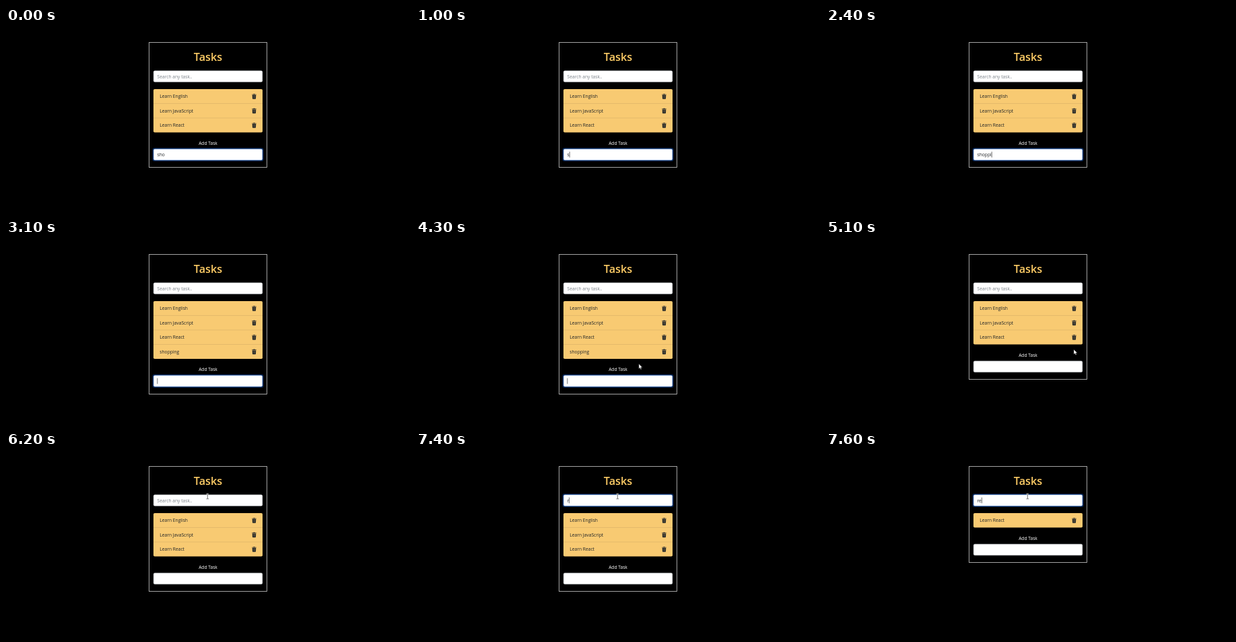
An HTML page that plays this animation: 600 by 274 pixels, repeating every 8 s.

```html
<!DOCTYPE html>
<html lang="en">
<head>
<meta charset="utf-8">
<title>Tasks</title>
<style>
  html, body { margin: 0; width: 100%; height: 100%; overflow: hidden; background: #000; }
  svg { display: block; width: 100%; height: 100%; }
  text { font: 6.7px "Open Sans", "Noto Sans", sans-serif; fill: #212529; }
  .title { font-size: 16.3px; font-weight: 600; fill: #ffcd66; }
  .hint { fill: #7c838a; }
  .label { fill: #fff; }
  .mid { text-anchor: middle; }
</style>
</head>
<body>
<svg id="stage" viewBox="0 0 600 274" xmlns="http://www.w3.org/2000/svg">
  <defs>
    <g id="trash">
      <path d="M-3.2-3.1h2l.5-.7h1.4l.5.7h2v.9h-6.4zM-2.8-1.8h5.6l-.3 5.1q0 .6-.7.6h-3.6q-.7 0-.7-.6z" fill="#212529"/>
      <path d="M-1.2-.9v3.8M0-.9v3.8M1.2-.9v3.8" stroke="#f8ca72" stroke-width=".35" opacity=".6"/>
    </g>
    <path id="arrow" d="M0 0v7.2l1.7-1.5 1.1 2.6 1.2-.5-1.1-2.5h2.3z" fill="#fff" stroke="#222" stroke-width=".45"/>
    <path id="hand" d="M-1-4q.8-.7 1.5 0v2.5l2.3.5q.7.3.6 1.1l-.5 2.3-.6 1.8h-3.4l-2-3q-.3-1 .6-.9l1.5.8z" fill="#fff" stroke="#222" stroke-width=".5"/>
    <g id="beam" fill="none">
      <path d="M-1.7-3.6h1.2l.5.4.5-.4h1.2M0-3.2v6.4M-1.7 3.6h1.2l.5-.4.5.4h1.2" stroke="#fff" stroke-width="1.5"/>
      <path d="M-1.7-3.6h1.2l.5.4.5-.4h1.2M0-3.2v6.4M-1.7 3.6h1.2l.5-.4.5.4h1.2" stroke="#333" stroke-width=".7"/>
    </g>
  </defs>
  <rect id="frame" x="212.5" y="21.5" width="175" fill="none" stroke="#b4b4b4" stroke-width=".9"/>
  <text class="title mid" x="300" y="49.4">Tasks</text>
  <g id="search"></g>
  <g id="list"></g>
  <g id="add"><text class="label mid" x="300" y="-6.1">Add Task</text></g>
  <use id="pointer"/>
</svg>
<script>
const LOOP = 8000, ROW = 21.5, TOP = 91;
const $ = id => document.getElementById(id);

function el(parent, tag, attrs, content) {
  const node = document.createElementNS('http://www.w3.org/2000/svg', tag);
  set(node, attrs);
  if (content) node.textContent = content;
  return parent.appendChild(node);
}
function set(node, attrs) {
  for (const k in attrs) node.setAttribute(k, attrs[k]);
}
const show = (node, on) => node.style.display = on ? '' : 'none';

function makeField(g, hint) {
  const ring = el(g, 'rect', { x: 217.4, y: -1.6, width: 165.2, height: 20.2, rx: 3, fill: '#0d6efd', opacity: .3 });
  const box = el(g, 'rect', { x: 219.2, y: .2, width: 161.6, height: 16.6, rx: 1.8, fill: '#fff', 'stroke-width': .5 });
  const placeholder = el(g, 'text', { x: 224.5, y: 11.4, class: 'hint' }, hint);
  const text = el(g, 'text', { x: 224.5, y: 11.4 });
  const caret = el(g, 'rect', { y: 4.2, width: .6, height: 8.6, fill: '#111' });
  return (y, value, focused, caretOn) => {
    g.setAttribute('transform', `translate(0 ${y})`);
    show(ring, focused);
    box.setAttribute('stroke', focused ? '#86b7fe' : '#ced4da');
    show(placeholder, !value);
    text.textContent = value;
    show(caret, focused && caretOn);
    caret.setAttribute('x', 224.6 + (value ? text.getComputedTextLength() : 0));
  };
}
const drawSearch = makeField($('search'), 'Search any task..');
const drawAdd = makeField($('add'), '');

const panel = el($('list'), 'rect', { x: 219, y: TOP, width: 162, rx: 1.8, fill: '#f8ca72' });
const rows = ['Learn English', 'Learn JavaScript', 'Learn React', 'shopping'].map(name => {
  const g = el($('list'), 'g', {});
  const line = el(g, 'path', { d: 'M219 0h162', stroke: '#d9b167', 'stroke-width': .6 });
  el(g, 'text', { x: 228.3, y: 13.2 }, name);
  el(g, 'use', { href: '#trash', x: 368.5, y: 10.8 });
  return { name, g, line };
});

// [time, value] steps; the last one reached holds.
const typed = [[0, 'sho'], [100, 'sh'], [300, 's'], [400, ''], [700, 's'], [1200, 'sh'], [1500, 'sho'],
  [1700, 'shop'], [1800, 'shopp'], [2400, 'shoppi'], [2800, 'shoppin'], [2900, 'shopping'], [3100, '']];
const query = [[0, ''], [7400, 'r'], [7600, 're']];
const at = (steps, t) => steps.filter(s => s[0] <= t).pop()[1];

const blink = (t, from) => Math.floor((t - from) / 500) % 2 === 0;

function glide(t, from, to, a, b) {
  const p = Math.min(1, Math.max(0, (t - from) / (to - from)));
  const e = p * p * (3 - 2 * p);
  return a.map((v, i) => v + (b[i] - v) * e);
}

function drawPointer(t) {
  const node = $('pointer');
  show(node, t >= 4200);
  const [x, y] = t < 5500
    ? glide(t, 4100, 4700, [318, 196], [368, 167])
    : glide(t, 5500, 6200, [368, 167], [299.3, 66.2]);
  let kind = 'arrow';
  if (y < 80) kind = 'beam';
  else if (t < 5000 && x > 364) kind = 'hand';
  set(node, { href: '#' + kind, x, y: kind === 'arrow' ? y - 4 : y });
}

function render(t) {
  const find = at(query, t);
  const hasNew = t >= 3100 && t < 5000;
  let n = 0;
  for (const { name, g, line } of rows) {
    const on = name.toLowerCase().includes(find) && (name !== 'shopping' || hasNew);
    show(g, on);
    if (!on) continue;
    g.setAttribute('transform', `translate(0 ${TOP + n * ROW})`);
    show(line, n > 0);
    n++;
  }
  const bottom = TOP + n * ROW;
  panel.setAttribute('height', n * ROW);
  $('frame').setAttribute('height', Math.floor(bottom + 52) - 21);

  drawSearch(63.5, find, t >= 6300, t >= 7400 || blink(t, 6300));
  drawAdd(bottom + 24.5, at(typed, t), t < 4900, t >= 100 && (t < 3100 || blink(t, 3000)));
  drawPointer(t);
}

function tick(now) {
  render(Math.floor(now % LOOP / 100) * 100);
  requestAnimationFrame(tick);
}
render(0);
requestAnimationFrame(tick);
</script>
</body>
</html>
```
